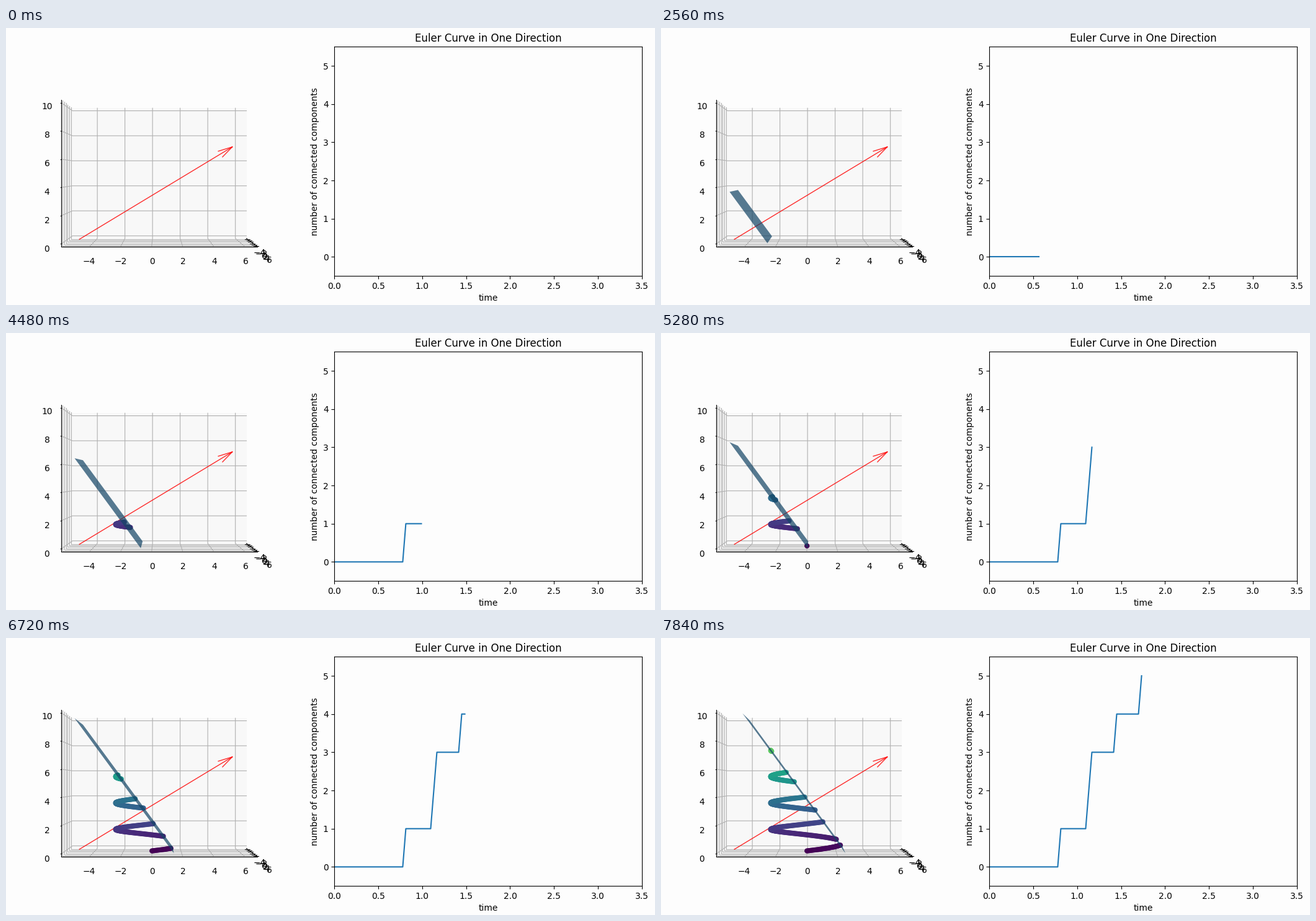
Recreate the animation shown at these times as a matplotlib script. Size 1046 by 447 pixels, loop 8000 ms.

```python
import numpy as np
import matplotlib.pyplot as plt
from matplotlib.animation import FuncAnimation
from matplotlib.patches import Polygon

W, H, DPI = 1046, 447, 100
STEPS, INTERVAL = 50, 160
PAPER = "#fdfdfd"

# Limits of the 3D box: x points at the viewer, y to the right, z up
LOW, HIGH = -5.802, 6.802
Z_LOW, Z_HIGH = -0.208, 10.208
TICKS = range(-4, 7, 2)
Z_TICKS = range(0, 11, 2)

# Direction of the sweep in the y-z plane
NY, NZ = 3, 2
TIMES = np.linspace(0, 3.5, 100)


def project(x, y, z):
    """Perspective view along the x axis, in pixels from the top left."""
    depth = 10 - 0.09445 * (x - 0.5)
    px = 247.3 + 2496 * 0.09445 * (y - 0.5) / depth
    py = 234.5 - 2496 * 0.08571 * (z - 5) / depth
    return px, py


def path(points):
    return np.array([project(*p) for p in points])


fig = plt.figure(figsize=(W / DPI, H / DPI), dpi=DPI, facecolor=PAPER)
stage = fig.add_axes([0, 0, 1, 1])
stage.set_xlim(0, W)
stage.set_ylim(H, 0)
stage.axis("off")


def pane(points, color):
    stage.add_patch(Polygon(path(points), fc=color, lw=0, zorder=1))


def line(points, color, lw=0.8, zorder=2, **kw):
    stage.plot(*path(points).T, color=color, lw=lw, zorder=zorder, **kw)


def label(px, py, value):
    text = str(value).replace("-", "\u2212")
    stage.text(px, py + 5, text, fontsize=10, ha="center", va="baseline")


def draw_box():
    pane([(LOW, LOW, Z_LOW), (LOW, HIGH, Z_LOW),
          (LOW, HIGH, Z_HIGH), (LOW, LOW, Z_HIGH)], "#f8f8f8")
    pane([(HIGH, LOW, Z_LOW), (LOW, LOW, Z_LOW),
          (LOW, LOW, Z_HIGH), (HIGH, LOW, Z_HIGH)], "#fafafa")
    pane([(HIGH, LOW, Z_LOW), (HIGH, HIGH, Z_LOW),
          (LOW, HIGH, Z_LOW), (LOW, LOW, Z_LOW)], "#f9f9f9")

    grid = "#b0b0b0"
    for v in TICKS:
        line([(HIGH, v, Z_LOW), (LOW, v, Z_LOW), (LOW, v, Z_HIGH)], grid)
        line([(v, HIGH, Z_LOW), (v, LOW, Z_LOW), (v, LOW, Z_HIGH)], grid)
        line([(v, HIGH - 0.21, Z_LOW), (v, HIGH + 0.14, Z_LOW)], "black")
        label(235 + 25.2 * v, 376, v)
        label(409 + 1.5 * (v + 4), 362 + 1.2 * (v + 4), v)
    for v in Z_TICKS:
        line([(HIGH, LOW, v), (LOW, LOW, v), (LOW, HIGH, v)], grid)
        line([(HIGH, LOW - 0.07, v), (HIGH, LOW, v)], "black")
        label(66, 356 - 23 * v, v)

    line([(HIGH, LOW, Z_HIGH), (HIGH, LOW, Z_LOW), (HIGH, HIGH, Z_LOW)],
         "black", zorder=3)
    line([(HIGH, HIGH, Z_LOW), (LOW, HIGH, Z_LOW)], "black", zorder=3)


def draw_arrow():
    tail = np.array([0, -5, 0])
    tip = tail + 3.5 * np.array([0, NY, NZ])
    style = dict(color="red", lw=1, zorder=4, alpha=0.83)
    line([tail, tip], **style)
    size = 0.08 * np.linalg.norm(tip - tail)
    heading = np.arctan2(NZ, NY)
    for turn in np.radians([-15, 15]):
        a = heading + turn
        line([tip, tip - size * np.array([0, np.cos(a), np.sin(a)])], **style)


draw_box()
draw_arrow()

# Helix, with the level at which the sweeping plane reaches each point
hz = np.linspace(0, 10, 1001)
hx, hy = 2.5 * np.cos(np.pi * hz), 2.5 * np.sin(np.pi * hz)
level = (NY * (hy + 5) + NZ * hz) / (NY**2 + NZ**2)
spots = np.column_stack(project(hx, hy, hz))
colors = plt.get_cmap("viridis")(hz / 10)
far_first = np.argsort(hx, kind="stable")


def components(t):
    """Number of separate helix pieces behind the plane."""
    inside = np.concatenate([[0], (level <= t).astype(int)])
    return np.sum(np.diff(inside) == 1)


counts = np.array([components(t) for t in TIMES[:STEPS]])

dots = stage.scatter([], [], s=20, linewidths=1.5, zorder=5)
plane = Polygon(np.zeros((4, 2)), fc=(0.07, 0.263, 0.392), alpha=0.7,
                lw=0, zorder=6)
stage.add_patch(plane)

# Curve panel
chart = fig.add_axes([529.3 / W, (H - 400.2) / H, 495.5 / W, 370 / H],
                     facecolor=PAPER)
chart.set_xlim(0, 3.5)
chart.set_ylim(-0.5, 5.5)
chart.set_title("Euler Curve in One Direction")
chart.set_xlabel("time")
chart.set_ylabel("number of connected components")
curve, = chart.plot([], [], color="#1f77b4", lw=1.5)


def update(i):
    t = TIMES[i]

    # The plane meets the floor at `foot` and is cut by the box
    foot = -5 + t * (NY**2 + NZ**2) / NY
    top_y = max(-5, foot - 10 * NZ / NY)
    top_z = (foot - top_y) * NY / NZ
    plane.set_xy(path([(6, top_y, top_z), (-5, top_y, top_z),
                       (-5, foot, 0), (6, foot, 0)]))

    shown = far_first[level[far_first] <= t]
    dots.set_offsets(spots[shown])
    dots.set_color(colors[shown])

    curve.set_data(TIMES[:i + 1], counts[:i + 1])
    return plane, dots, curve


anim = FuncAnimation(fig, update, frames=STEPS, interval=INTERVAL,
                     repeat=True, repeat_delay=0)
plt.show()
```
